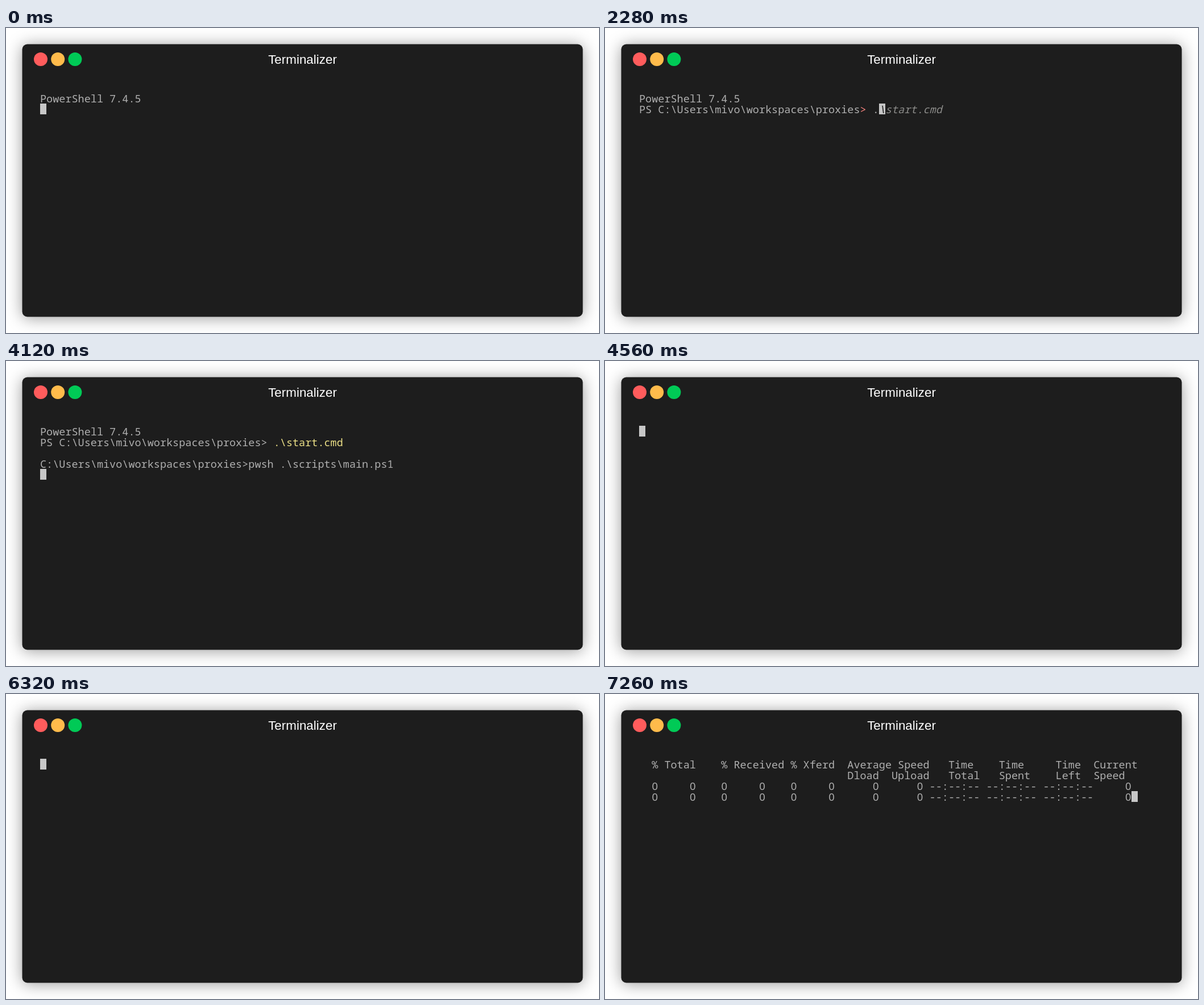
Write an HTML page with a canvas that moves like this. It is 1043 px wide and 537 px high and loops after 8000 ms.

```html
<!DOCTYPE html>
<html lang="en">
<head>
<meta charset="utf-8">
<title>Terminal session</title>
<style>
html, body { margin: 0; width: 100%; height: 100%; overflow: hidden; background: #fff; }
canvas { display: block; }
</style>
</head>
<body>
<canvas id="stage" width="1043" height="537"></canvas>
<script>
const ctx = document.getElementById('stage').getContext('2d');
const LOOP = 8000, LEFT = 60, TOP = 114, CELL = 11.1, ROW = 19;
const BG = '#1d1d1d', FG = '#afafaf', CURSOR = '#c7c7c7';
const YELLOW = '#ebdf86', RED = '#f5827d', DIM = '#8b8b89';
const MONO = '18.5px "Noto Sans Mono", monospace';
const PLAIN_ZERO = '18.5px "Noto Sans", sans-serif';

const cwd = 'C:\\Users\\mivo\\workspaces\\proxies';
const version = 'PowerShell 7.4.5';
const prompt = 'PS ' + cwd;
const command = [[prompt + '> '], ['.\\start.cmd', YELLOW]];
const menu = [
  'Choose operation:',
  '1. update/download core',
  '2. update/download mmdb',
  '3: update subscription',
  '0: quit'
];
const header = [
  '  % Total    % Received % Xferd  Average Speed   Time    Time     Time  Current',
  '                                 Dload  Upload   Total   Spent    Left  Speed'
];
const zeros = '  0     0    0     0    0     0      0      0 --:--:-- --:--:-- --:--:--     0';

// start time, lines, cursor row, cursor column, extra drawing
const scenes = [
  [0, [version], 1, 0],
  [280, [version, prompt + '> '], 1, 37],
  [2280, [version, [[prompt], ['> ', RED], ['.'], ['\\start.cmd', DIM, true]]], 1, 38],
  [3270, [version, command], 1, 48],
  [4100, [version, command], 2, 0],
  [4120, [version, command, '', cwd + '>pwsh .\\scripts\\main.ps1'], 4, 0],
  [4560, [], 0, 0],
  [4580, menu, 5, 0, drawIcons],
  [6320, [], 0, 0],
  [6340, [...header, zeros], 2, 78],
  [6950, [...header, zeros], 3, 0],
  [7260, [...header, zeros, zeros], 3, 78]
];

function circle(x, y, r, color) {
  ctx.fillStyle = color;
  ctx.beginPath();
  ctx.arc(x, y, r, 0, Math.PI * 2);
  ctx.fill();
}

function box(x, y, w, h, color, r = 0) {
  ctx.fillStyle = color;
  ctx.beginPath();
  ctx.roundRect(x, y, w, h, r);
  ctx.fill();
}

function shape(path, color) {
  ctx.fillStyle = color;
  ctx.fill(new Path2D(path));
}

function at(x, y, draw) {
  ctx.save();
  ctx.translate(x, y);
  draw();
  ctx.restore();
}

function drawWindow() {
  ctx.fillStyle = '#fff';
  ctx.fillRect(0, 0, 1043, 537);
  ctx.save();
  ctx.shadowColor = 'rgba(0,0,0,.4)';
  ctx.shadowBlur = 28;
  ctx.shadowOffsetY = 2;
  box(28.5, 28.5, 986, 480, BG, 9);
  ctx.restore();
  ['#ff5c5c', '#ffbb4b', '#00ca56'].forEach((c, i) => circle(61 + 30.2 * i, 55, 12, c));
  ctx.font = '22.4px "Liberation Sans", Arial, sans-serif';
  ctx.textAlign = 'center';
  ctx.fillStyle = '#fff';
  ctx.fillText('Terminalizer', 521.5, 63);
}

function drawLine(line, row, cursorRow, cursorCol) {
  const runs = typeof line === 'string' ? [[line]] : line;
  let col = 0;
  for (const [text, color = FG, italic] of runs) {
    for (const ch of text) {
      const covered = row === cursorRow && col === cursorCol;
      ctx.font = (italic ? 'italic ' : '') + (ch === '0' ? PLAIN_ZERO : MONO);
      ctx.fillStyle = covered ? BG : color;
      ctx.fillText(ch, LEFT + (col + 0.5) * CELL, TOP + row * ROW + 16.5);
      col++;
    }
  }
}

function drawRocket() {
  ctx.rotate(Math.PI / 4);
  shape('M-3 5 L0 13 L3 5Z', '#f8a23a');
  shape('M-3 0 L-7 5 L-6 9 L-2 6Z M3 0 L7 5 L6 9 L2 6Z', '#d8352f');
  shape('M0 -13 Q8 -3 3 7 H-3 Q-8 -3 0 -13Z', '#ece9f1');
  shape('M0 -13 Q3 -10 4 -7 H-4 Q-3 -10 0 -13Z', '#e5413c');
  circle(0, -2, 2, '#5b5870');
}

function drawCabinet() {
  box(0, 0, 11, 17, '#41357c', 1);
  for (const y of [1, 9]) {
    box(1, y, 9, 7, '#54449a');
    box(3, y + 2, 5, 2, '#f1edff');
  }
}

function drawRefresh() {
  box(0, 0, 20, 18, '#08a4ee', 2);
  ctx.strokeStyle = '#fff';
  ctx.lineWidth = 2;
  for (const turn of [0, Math.PI]) {
    at(10, 9, () => {
      ctx.rotate(turn);
      ctx.beginPath();
      ctx.arc(0, 0, 4.5, Math.PI, Math.PI * 1.8);
      ctx.stroke();
      shape('M1.5 -1 H6 V-5.5Z', '#fff');
    });
  }
}

function drawEnd() {
  shape('M0 5 L6 0 V3 H20 V7 H6 V10Z', '#7559c7');
  ctx.font = 'bold 7px "Liberation Sans", Arial, sans-serif';
  ctx.fillStyle = '#8064d2';
  ctx.fillText('END', 10, 17);
}

function drawIcons() {
  at(340.5, 142, drawRocket);
  at(334.5, 153, drawCabinet);
  at(319, 171.5, drawRefresh);
  at(152, 191, drawEnd);
}

function frame(now) {
  const t = now % LOOP;
  const [, lines, row, col, extra] = scenes.findLast(s => s[0] <= t) || scenes[0];
  drawWindow();
  box(LEFT + Math.round(col * CELL), TOP + row * ROW, 11, ROW, CURSOR);
  lines.forEach((line, i) => drawLine(line, i, row, col));
  if (extra) extra();
  requestAnimationFrame(frame);
}
requestAnimationFrame(frame);
</script>
</body>
</html>
```
